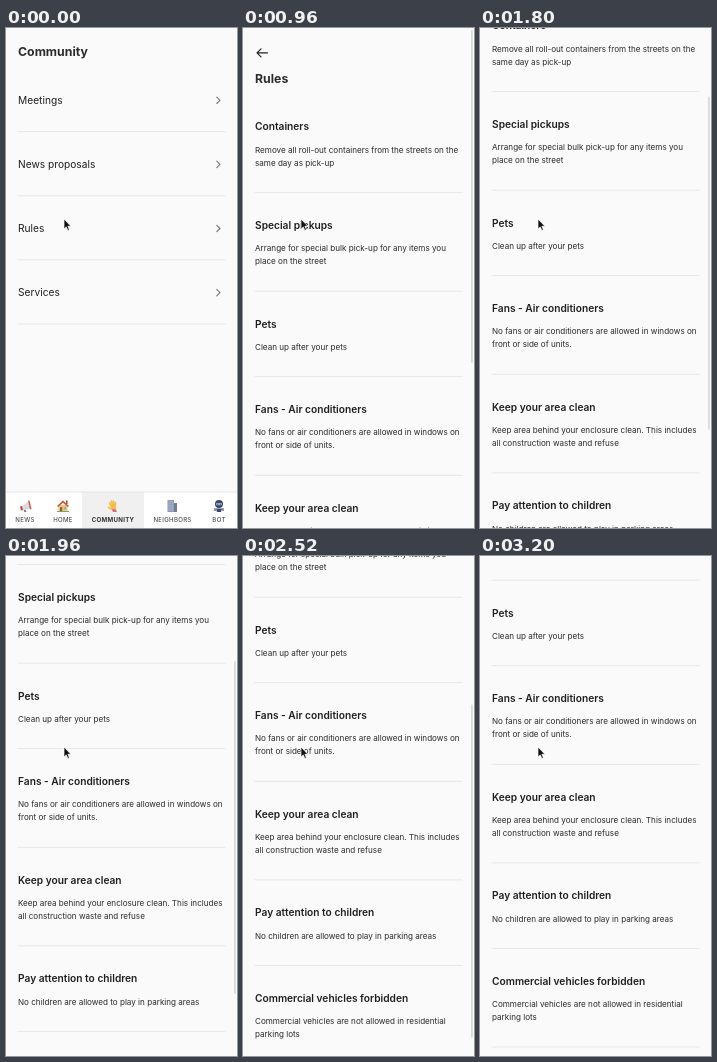
Recreate the animation shown at these times as an HTML page. Size 231 by 500 pixels, loop 3.8 s.

```html
<!DOCTYPE html>
<html lang="en">
<head>
<meta charset="utf-8">
<title>Community rules</title>
<style>
html, body { margin: 0; width: 100%; height: 100%; overflow: hidden; background: #fafafa; }
svg { display: block; width: 100vw; height: 100vh; }
text { font-family: Inter, "Open Sans", sans-serif; fill: #1f1f21; }
.title { font-size: 12.3px; font-weight: 700; fill: #2c2c2e; }
.item { font-size: 10.2px; }
.head { font-size: 10.2px; font-weight: 600; }
.body { font-size: 8.1px; fill: #2a2a2c; }
.tab { font-size: 6.1px; letter-spacing: .3px; text-anchor: middle; fill: #333; }
.tab.on { font-weight: 700; }
.rule { stroke: #e7e7e7; stroke-width: 1; }
.line { fill: none; stroke-linecap: round; stroke-linejoin: round; }
</style>
</head>
<body>
<svg viewBox="0 0 231 500">
  <g id="menu">
    <rect width="231" height="500" fill="#fafafa"/>
    <text class="title" x="12" y="28.4">Community</text>
    <g id="items"></g>
    <rect y="464" width="231" height="36" fill="#fff"/>
    <rect x="76" y="464" width="62" height="36" fill="#f0f0f0"/>
    <path d="M0 464H231" stroke="#e4e4e4"/>
    <g id="tabs"></g>

    <g transform="translate(19.5 478)">
      <path d="M-4 1L3 -5L5 3L-3 4Z" fill="#d9dbe0"/>
      <path d="M-5.500 .5L-3.500 0L-2.500 4L-4.500 4.500Z" fill="#c9483c"/>
      <path d="M2.500 -5.500L4 -5.500L6 3L4.500 3.500Z" fill="#d8574a"/>
      <path d="M-2 4L0 3.700L1 6H-1Z" fill="#75777c"/>
    </g>
    <g transform="translate(57 478)">
      <path d="M-4.500 -1H4.500V5.500H-4.500Z" fill="#f0c773"/>
      <path d="M3 -5.500H4.600V-2H3Z" fill="#9c5a42"/>
      <path d="M-6 0L0 -5.500L6 0L5 1L0 -3.200L-5 1Z" fill="#c8553d"/>
      <path d="M-3 1.200H-.8V5.500H-3Z" fill="#8b5a3c"/>
      <path d="M.8 1.200H3.300V3.500H.8Z" fill="#79b4d8"/>
      <path d="M-6 5H6V6H-6Z" fill="#7ea35a"/>
    </g>
    <g transform="translate(106.500 478)">
      <g class="line" stroke="#f4bd4a" stroke-width="1.700">
        <path d="M-3 -3L-1 1M-1.200 -5L0 0M1 -5L1.300 0M3 -3.500L2.600 1M-4 1.500L-1.500 3"/>
      </g>
      <path d="M-2.500 -.5L3.400 -.5Q4.200 2 2.500 4L-.5 4.200Z" fill="#f4bd4a"/>
      <path d="M-.8 3.300L3 3L4.500 6H.5Z" fill="#e56a78"/>
    </g>
    <g transform="translate(166 478)">
      <path d="M-4.500 -6H2V6H-4.500Z" fill="#8f9bb5"/>
      <path d="M2 -3H5V6H2Z" fill="#717d98"/>
      <path d="M-3 -5V5M-1.200 -5V5M.6 -5V5" stroke="#c0c9da" stroke-width=".8" stroke-dasharray="1.200 .9"/>
    </g>
    <g transform="translate(213 478)">
      <circle cy="-2" r="4" fill="#3c4668"/>
      <path d="M-2.800 -3H2.800V-.8H-2.800Z" fill="#aebbd5"/>
      <circle cx="-1.300" cy="-1.900" r=".6" fill="#26304f"/>
      <circle cx="1.300" cy="-1.900" r=".6" fill="#26304f"/>
      <path d="M-3 2.500H3L2 6H-2Z" fill="#3c4668"/>
      <path class="line" d="M-4 2.500V4.500M4 2.500V4.500" stroke="#3c4668" stroke-width="1.200"/>
    </g>
  </g>

  <g id="page">
    <rect width="231" height="500" fill="#fafafa"/>
    <g id="list">
      <path class="line" d="M14 24.800H24.500M18 20.800L14 24.800L18 28.800" stroke="#222" stroke-width="1.200"/>
      <text class="title" x="12" y="55">Rules</text>
    </g>
    <rect id="bar" x="228" y="2" width="1.800" height="333" rx=".9" fill="#d9d9d9"/>
  </g>

  <path d="M58 191V201L60.300 198.900L61.800 202.400L63.400 201.700L61.900 198.300H64.900Z"
        fill="#111" stroke="#fff" stroke-width=".7" stroke-linejoin="round"/>
</svg>
<script>
const LOOP = 3800, STEP = 40, WIDTH = 231;
const $ = id => document.getElementById(id);

function add(parent, tag, attrs, text) {
  const el = document.createElementNS("http://www.w3.org/2000/svg", tag);
  for (const k in attrs) el.setAttribute(k, attrs[k]);
  if (text) el.textContent = text;
  parent.append(el);
}
const label = (parent, cls, x, y, text) => add(parent, "text", { class: cls, x, y }, text);
const divider = (parent, y) => add(parent, "path", { class: "rule", d: `M11.500 ${y}H219.500` });

["Meetings", "News proposals", "Rules", "Services"].forEach((name, i) => {
  const y = 72.3 + 64.1 * i;
  label($("items"), "item", 12, y + 3.6, name);
  add($("items"), "path", {
    class: "line", d: `M210.800 ${y - 3.2}L214 ${y}L210.800 ${y + 3.2}`,
    stroke: "#777", "stroke-width": 1.1
  });
  divider($("items"), y + 31.4);
});

[["NEWS", 19], ["HOME", 57], ["COMMUNITY", 107], ["NEIGHBORS", 166.5], ["BOT", 213]]
  .forEach(([name, x], i) => label($("tabs"), i === 2 ? "tab on" : "tab", x, 494, name));

const rules = [
  ["Containers", "Remove all roll-out containers from the streets on the", "same day as pick-up"],
  ["Special pickups", "Arrange for special bulk pick-up for any items you", "place on the street"],
  ["Pets", "Clean up after your pets"],
  ["Fans - Air conditioners", "No fans or air conditioners are allowed in windows on", "front or side of units."],
  ["Keep your area clean", "Keep area behind your enclosure clean. This includes", "all construction waste and refuse"],
  ["Pay attention to children", "No children are allowed to play in parking areas"],
  ["Commercial vehicles forbidden", "Commercial vehicles are not allowed in residential", "parking lots"]
];
let baseY = 102.3;
for (const [heading, ...lines] of rules) {
  label($("list"), "head", 12, baseY, heading);
  lines.forEach((s, i) => label($("list"), "body", 12, baseY + 22.3 + 13.1 * i, s));
  const extra = 13.1 * (lines.length - 1);
  divider($("list"), baseY + 49.2 + extra);
  baseY += 85.5 + extra;
}

// Tables of [ms, value], linear in between
const scrollTable = [
  [1560, 0], [1600, 3], [1640, 12], [1680, 30], [1720, 54], [1760, 79], [1800, 101],
  [1840, 119], [1880, 134], [1920, 146], [1960, 156], [2000, 165], [2040, 172], [2080, 178],
  [2320, 178], [2360, 181.5], [2400, 189], [2440, 200], [2480, 212], [2520, 222],
  [2600, 234], [2680, 239.5], [2800, 242], [2880, 242], [2960, 240.8], [3040, 239.8], [3200, 239]
];
const barTable = [[920, 0], [960, 1], [2880, 1], [3200, 0]];

function at(table, t) {
  const i = table.findIndex(p => p[0] >= t);
  if (i < 0) return table[table.length - 1][1];
  if (i === 0) return table[0][1];
  const [t0, a] = table[i - 1], [t1, b] = table[i];
  return a + (b - a) * (t - t0) / (t1 - t0);
}

// Eased page push, 0 to 1
function push(t) {
  const p = Math.min(1, Math.max(0, t / 560));
  const u = 1 - (1 - p) ** 2;
  return u * u * (3 - 2 * u);
}

function play(id, pose) {
  const n = LOOP / STEP, keys = [];
  for (let i = 0; i <= n; i++)
    keys.push({ ...pose(Math.min(i, n - 1) * STEP), offset: i / n, easing: "step-end" });
  $(id).animate(keys, { duration: LOOP, iterations: Infinity });
}
const move = (x, y) => ({ transform: `translate(${x.toFixed(2)}px, ${y.toFixed(2)}px)` });

play("menu", t => move(-0.3 * WIDTH * push(t), 0));
play("page", t => move(WIDTH * (1 - push(t)), 0));
play("list", t => move(0, -at(scrollTable, t)));
play("bar", t => ({ ...move(0, 0.66 * at(scrollTable, t)), opacity: at(barTable, t) }));
</script>
</body>
</html>
```
